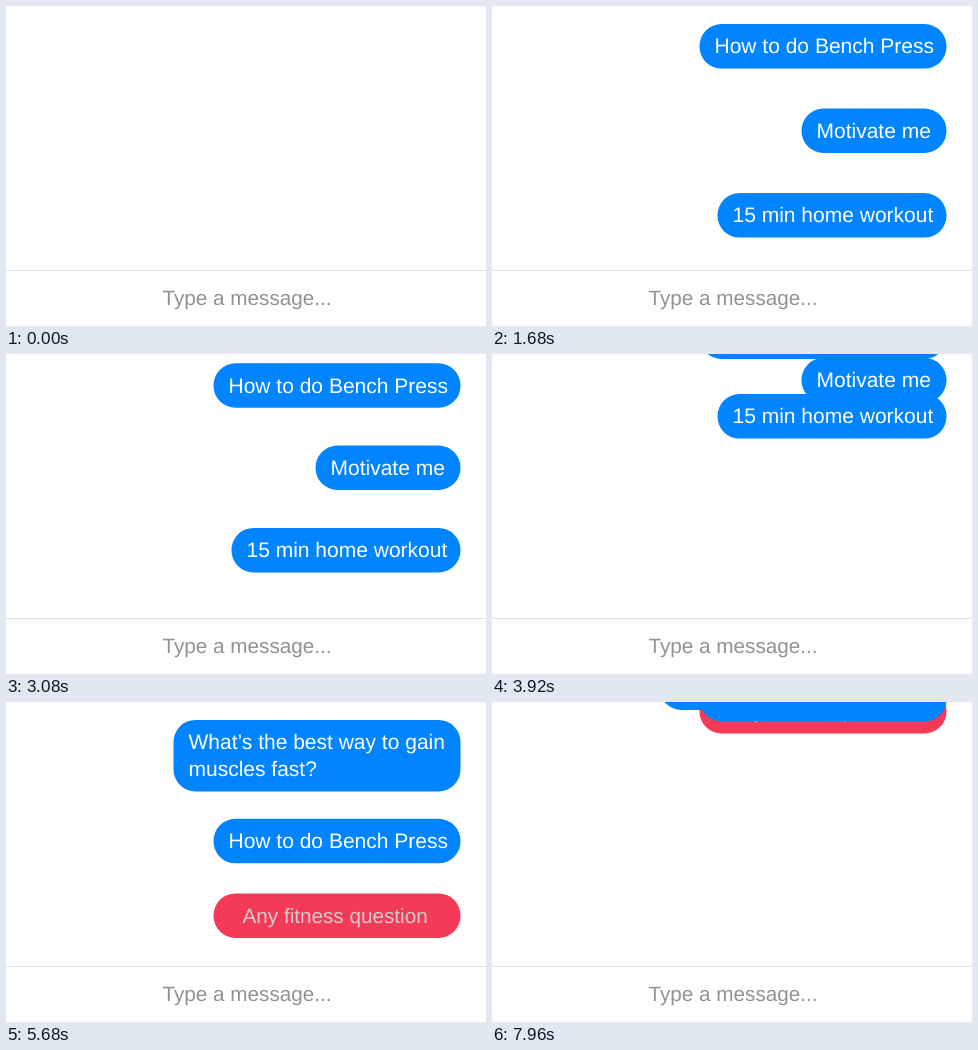
Recreate the animation shown at these times as an HTML page with a canvas. Size 480 px wide and 320 px high, loop 8 s.

```html
<!DOCTYPE html>
<html lang="en">
<head>
<meta charset="utf-8">
<title>Chat bubbles</title>
<style>
  html, body { margin: 0; width: 100%; height: 100%; overflow: hidden; background: #fff; }
  canvas { display: block; }
</style>
</head>
<body>
<canvas id="stage" width="480" height="320"></canvas>
<script>
const ctx = document.getElementById('stage').getContext('2d');

const LOOP = 8000, SCENE = 4000, STEP = 40;
const EASE_IN = 400, EXIT_AT = 3600;
const RIGHT = 454.5, FOOTER = 264;
const BLUE = '#0084ff', RED = '#f53a57';

// Each bubble rises in, drifts from `top` (its place at mid-scene) at `speed` px/s, then leaves.
const bubble = (left, top, speed, enterFrom, exitBy, lines, style = {}) =>
  ({ left, top, speed, enterFrom, exitBy, lines, height: 44.5, pad: 15, size: 21, fill: BLUE, ink: '#fff', ...style });

const scenes = [
  [
    bubble(207.5, 16.1, 6.3, 360, 85, ['How to do Bench Press']),
    bubble(309.5, 100, 7.9, 520, 158, ['Motivate me']),
    bubble(225.5, 184.1, 9.4, 688, 246, ['15 min home workout'])
  ],
  [
    bubble(167.5, 15.9, 6.35, 360, 92, ['What’s the best way to gain', 'muscles fast?'], { height: 71.5 }),
    bubble(207.5, 114.3, 7.9, 520, 170, ['How to do Bench Press']),
    bubble(207.5, 188.4, 9.4, 688, 251, ['Any fitness question'], { pad: 29, size: 20.7, fill: RED, ink: '#d0cccc' })
  ]
];

function topAt(b, t) {
  const drift = b.top - b.speed * (t - SCENE / 2) / 1000;
  const entering = Math.max(0, 1 - t / EASE_IN) ** 3;
  const leaving = Math.max(0, (t - EXIT_AT) / (SCENE - EXIT_AT)) ** 3;
  return drift + (b.enterFrom - drift) * entering - b.exitBy * leaving;
}

function drawText(text, x, y, size, color) {
  ctx.font = `${size}px "Liberation Sans", Arial, sans-serif`;
  ctx.textRendering = 'geometricPrecision';
  ctx.fillStyle = color;
  ctx.fillText(text, x, y);
}

function drawBubble(b, t) {
  const y = topAt(b, t);
  ctx.fillStyle = b.fill;
  ctx.beginPath();
  ctx.roundRect(b.left, y, RIGHT - b.left, b.height, 22);
  ctx.fill();
  b.lines.forEach((line, i) => drawText(line, b.left + b.pad, y + 29.3 + i * 26.7, b.size, b.ink));
}

function drawFooter() {
  ctx.fillStyle = '#fff';
  ctx.fillRect(0, FOOTER, 480, 320 - FOOTER);
  ctx.fillStyle = '#e0e0e0';
  ctx.fillRect(0, FOOTER, 480, 1);
  drawText('Type a message...', 156.5, 299.3, 20.7, '#929292');
}

function draw(now) {
  const t = Math.floor(now % LOOP / STEP) * STEP;
  ctx.fillStyle = '#fff';
  ctx.fillRect(0, 0, 480, 320);
  // Upper bubbles cover the lower ones when they bunch up.
  [...scenes[Math.floor(t / SCENE)]].reverse().forEach(b => drawBubble(b, t % SCENE));
  drawFooter();
}

const start = performance.now();
function tick() {
  draw(performance.now() - start);
  requestAnimationFrame(tick);
}
tick();
</script>
</body>
</html>
```
